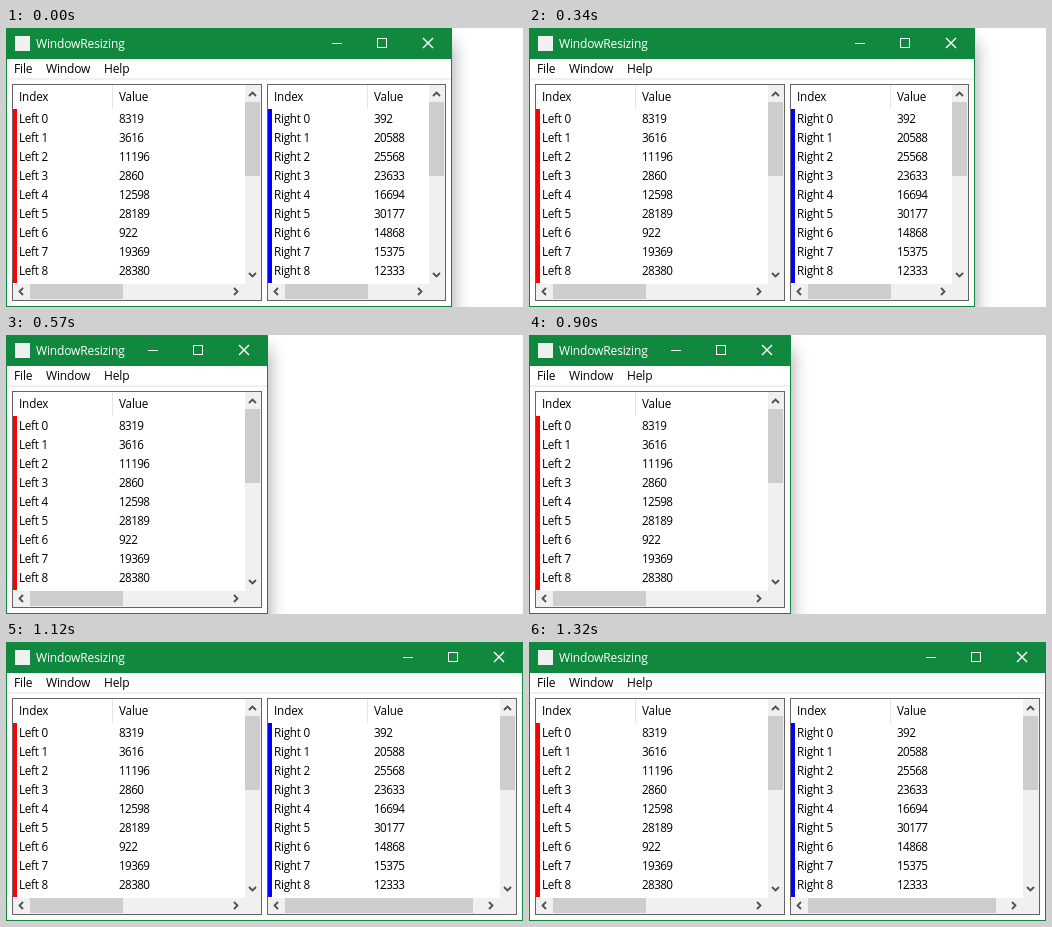
An HTML page with a canvas for the animation above (1460 ms loop, 517 by 279 pixels).

```html
<!DOCTYPE html>
<html>
<head>
<meta charset="utf-8">
<title>Window resizing</title>
<style>
  html, body { margin: 0; width: 517px; height: 279px; overflow: hidden; background: #fff; }
  canvas { display: block; }
</style>
</head>
<body>
<canvas id="stage" width="517" height="279"></canvas>
<script>
const ctx = document.getElementById('stage').getContext('2d');
const LOOP = 1460;
const STEPS = [[0, 446], [570, 262], [1120, 517]]; // start time, window width
const LEFT = [8319, 3616, 11196, 2860, 12598, 28189, 922, 19369, 28380];
const RIGHT = [392, 20588, 25568, 23633, 16694, 30177, 14868, 15375, 12333];

function rect(x, y, w, h, color) {
  ctx.fillStyle = color;
  ctx.fillRect(x, y, w, h);
}

function text(str, x, y, color = '#000', size = 12, spacing = -0.15) {
  ctx.font = `${size}px "Open Sans", "Noto Sans", sans-serif`;
  ctx.letterSpacing = spacing + 'px';
  ctx.fillStyle = color;
  ctx.fillText(str, x, y);
}

function line(points, color, width) {
  ctx.beginPath();
  points.forEach(([x, y]) => ctx.lineTo(x, y));
  ctx.strokeStyle = color;
  ctx.lineWidth = width;
  ctx.stroke();
}

// Chevron whose tip points along (dx, dy)
function arrow(x, y, dx, dy) {
  const at = (along, across) =>
    [x + dx * along + dy * across, y + dy * along + dx * across];
  line([at(-1.5, -3.5), at(2, 0), at(-1.5, 3.5)], '#505050', 1.8);
}

function panel(x, right, name, values, color, contentWidth) {
  const inner = right - 1;
  const view = inner - 17 - (x + 1);
  const track = view - 34;

  rect(x, 56, right - x, 217, '#646464');
  rect(x + 1, 57, right - x - 2, 215, '#fff');

  text('Index', x + 7, 73, '#000', 11.7);
  text('Value', x + 107, 73, '#000', 11.7);
  rect(x + 100, 57, 1, 24, '#e5e5e5');
  values.forEach((value, i) => {
    const y = 95 + i * 19;
    text(`${name} ${i}`, x + 7, y, '#000', 11.7, -0.25);
    text(value, x + 107, y, '#000', 11.7, -0.6);
  });
  rect(x + 1, 81, 4, 174, color);

  rect(inner - 16, 57, 16, 215, '#f0f0f0');
  rect(x + 1, 256, inner - x - 1, 16, '#f0f0f0');
  rect(inner - 16, 74, 15, 74, '#cdcdcd');
  rect(x + 18, 256, Math.round(track * view / contentWidth), 15, '#cdcdcd');
  arrow(inner - 8.5, 66.5, 0, -1);
  arrow(inner - 8.5, 246.5, 0, 1);
  arrow(x + 9.5, 263.5, -1, 0);
  arrow(inner - 25.5, 263.5, 1, 0);
}

function titleBar(w) {
  rect(0, 0, w, 31, '#10893e');
  rect(9, 8, 15, 15, '#f0f0f0');
  text('WindowResizing', 30, 20, '#fff');
  rect(w - 120, 15, 10, 1, '#fff');
  ctx.strokeStyle = '#fff';
  ctx.lineWidth = 1;
  ctx.strokeRect(w - 74.5, 10.5, 9, 9);
  line([[w - 29, 10], [w - 19, 20]], '#fff', 1.4);
  line([[w - 19, 10], [w - 29, 20]], '#fff', 1.4);
}

function draw(w) {
  rect(0, 0, 517, 279, '#fff');
  ctx.save();
  ctx.shadowColor = 'rgba(0, 0, 0, 0.4)';
  ctx.shadowBlur = 17;
  ctx.shadowOffsetY = 14;
  rect(0, 0, w, 279, '#10893e');
  ctx.restore();
  rect(1, 31, w - 2, 247, '#fff');
  rect(1, 50, w - 2, 2, '#f0f0f0');
  titleBar(w);
  text('File', 8, 45);
  text('Window', 40, 45);
  text('Help', 98, 45);

  panel(6, 256, 'Left', LEFT, '#f00', 489);
  if (w > 300) panel(261, w - 6, 'Right', RIGHT, '#00f', 242);
}

function frame() {
  const t = performance.now() % LOOP;
  draw(STEPS.findLast(([start]) => t >= start)[1]);
  requestAnimationFrame(frame);
}
frame();
</script>
</body>
</html>
```
